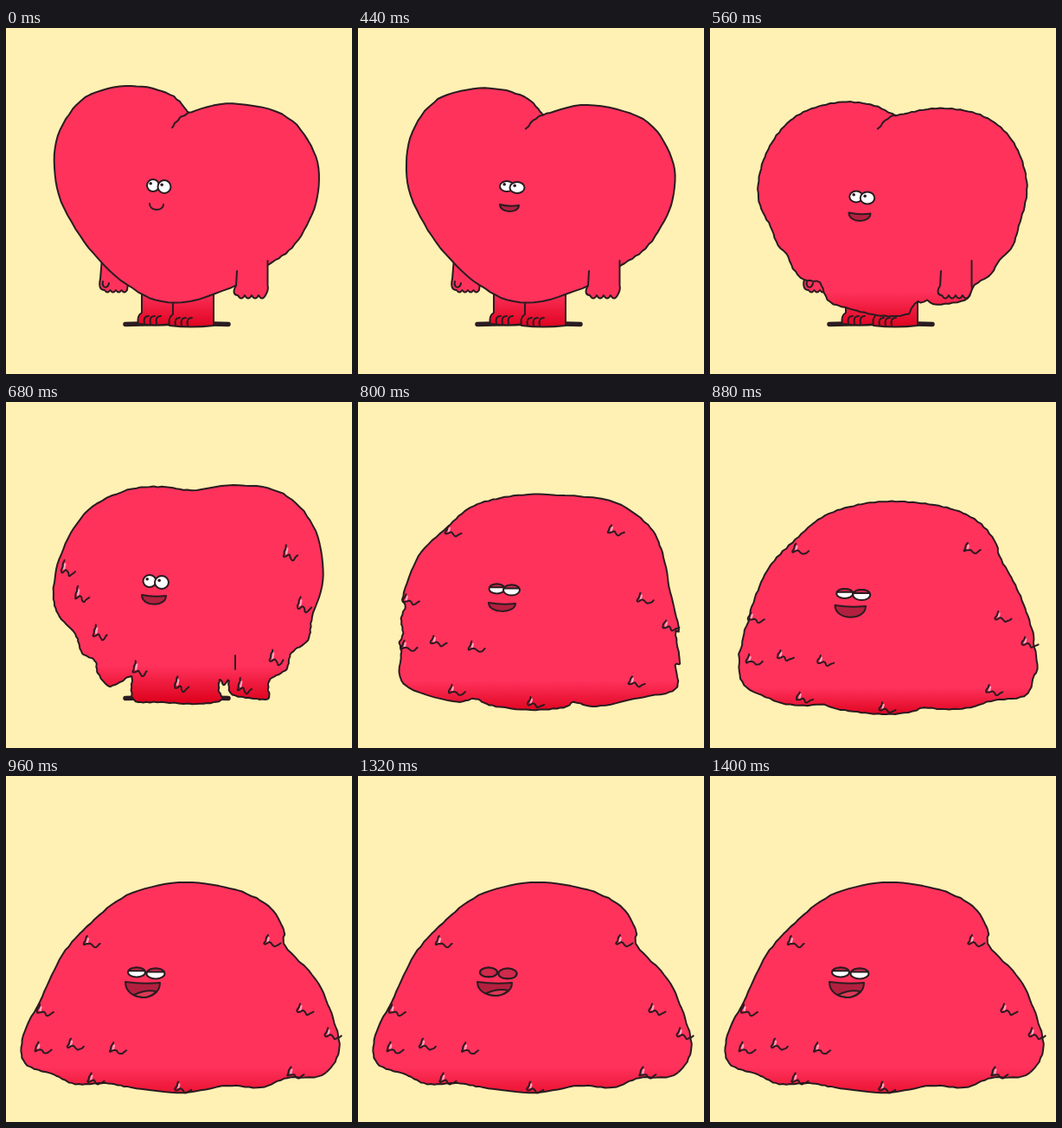
These frames come from a looping animation (400x400 px, 1.52 s). An HTML page:

```html
<!DOCTYPE html>
<html lang="en">
<head>
<meta charset="utf-8">
<title>Melting heart</title>
<style>
html, body { margin: 0; width: 100%; height: 100%; overflow: hidden; background: #fff0b3; }
svg { display: block; width: 100%; height: 100%; }
.pose { display: none; stroke: #2a1c20; stroke-width: 2; stroke-linecap: round; stroke-linejoin: round; fill: none; }
.pose.on { display: block; }
.shine { stroke: #ffa3bd; stroke-width: 2.4; }
</style>
</head>
<body>
<svg id="stage" viewBox="0 0 400 400"></svg>
<script>
const LOOP = 1520;
const SKIN = '#ff325c', DEEP = '#df0420', MOUTH = '#b3203f', TONGUE = '#dc3a56', LID = '#d02a4c';
const stage = document.getElementById('stage');

const points = s => s.split(' ').map(p => p.split(',').map(Number));
const mix = (a, b, t = .5) => a.map((v, i) => v + (b[i] - v) * t);

// Catmull-Rom curve through the points, as a dense polyline
function curve(pts, closed) {
  const n = pts.length, out = [], last = closed ? n : n - 1;
  const at = i => pts[closed ? (i + n) % n : Math.max(0, Math.min(n - 1, i))];
  for (let i = 0; i < last; i++) {
    const [a, b, c, d] = [at(i - 1), at(i), at(i + 1), at(i + 2)];
    for (let t = 0; t < 1; t += 1 / 8)
      out.push(b.map((v, j) => v + .5 * t * (c[j] - a[j] + t * (2 * a[j] - 5 * v + 4 * c[j] - d[j]
        + t * (3 * (v - c[j]) + d[j] - a[j])))));
  }
  return [...out, at(last)];
}

// Evenly spaced points along a polyline
function spread(line, n) {
  const sum = [0];
  for (let i = 1; i < line.length; i++)
    sum.push(sum[i - 1] + Math.hypot(line[i][0] - line[i - 1][0], line[i][1] - line[i - 1][1]));
  const out = [];
  for (let k = 0, i = 1; k <= n; k++) {
    const s = sum[sum.length - 1] * k / n;
    while (i < line.length - 1 && sum[i] < s) i++;
    out.push(mix(line[i - 1], line[i], (s - sum[i - 1]) / (sum[i] - sum[i - 1] || 1)));
  }
  return out;
}

function halfway(a, b) {
  const to = spread(b, 200);
  return spread(a, 200).map((p, i) => mix(p, to[i]));
}

// A slight wobble gives the hand-drawn line
const toPath = line => 'M' + line.map(([x, y]) =>
  (x + .4 * Math.sin(y * .9)).toFixed(1) + ',' + (y + .4 * Math.sin(x * .8)).toFixed(1)).join('L');
const path = (d, attrs = '') => `<path d="${d}" ${attrs}/>`;
const filled = (d, color) => path(d, `fill="${color}"`);

let defs = '';
function shade(id, top, bottom, color = DEEP) {
  defs += `<linearGradient id="${id}" gradientUnits="userSpaceOnUse" x1="0" x2="0" y1="${top}" y2="${bottom}">
    <stop stop-color="${SKIN}"/><stop offset="1" stop-color="${color}"/></linearGradient>`;
  return `url(#${id})`;
}

// Face: left eye x, y, radii, gap to the right eye, lid closure, mouth x, y, width, height
function face([x, y, rx, ry, gap, lid, mx, my, w, h]) {
  return eye(x, y, rx, ry, lid) + eye(x + gap, y + 1.5, rx + .5, ry + .5, lid) + mouth(mx, my, w, h);
}

function eye(x, y, rx, ry, lid) {
  const white = `<ellipse cx="${x}" cy="${y}" rx="${rx}" ry="${ry}" fill="#fff"/>`;
  if (!lid) return white + `<circle cx="${x - 2.8}" cy="${y - 2.3}" r="1.8" fill="#2a1c20" stroke="none"/>`;
  const k = 2 * lid - 1, c = rx * Math.sqrt(1 - k * k), edge = y + ry * k;
  return white + filled(`M${x - c},${edge}A${rx},${ry} 0 ${+(k > 0)} 1 ${x + c},${edge}Z`, LID);
}

function mouth(x, y, w, h) {
  if (h < 8) return path(`M${x},${y}c0,${h * 1.3} ${w},${h * 1.3} ${w},1`);
  const low = y + h * 1.3;
  const open = filled(`M${x},${y}q${w / 2},3 ${w},1C${x + w},${low} ${x},${low} ${x},${y}Z`, MOUTH);
  if (h < 15) return open;
  return open + filled(`M${x + w * .24},${y + h * .84}Q${x + w * .6},${y + h * .45} ${x + w * .9},${y + h * .62}`
    + `Q${x + w * .6},${y + h * 1.25} ${x + w * .24},${y + h * .84}Z`, TONGUE);
}

const faces = {
  idle: [170, 182, 7, 7, 13, 0, 166, 203, 16, 7],
  swell: [172, 183, 8, 6, 12, 0, 164, 204, 22, 8],
  melt: [166, 207, 7.5, 7, 14, 0, 157, 223, 28, 11],
  slump: [160.5, 216, 9, 5.5, 17, .33, 151, 232, 31, 10],
  puddle: [151, 227, 10, 5.5, 22, .33, 138, 238, 40, 18]
};
faces.sag = mix(faces.swell, faces.melt);
faces.spill = mix(faces.slump, faces.puddle);
faces.blink = faces.puddle.with(5, .95).with(9, 16);

// Outlines run clockwise from the top
const heart = curve(points('211,98 262,87 325,103 358,149 358,203 334,250 303,274 266,298 195,318 140,297 '
  + '90,247 59,185 60,125 92,80 145,67 190,77 211,98'));
const melted = curve(points('215,102 270,96 320,106 355,143 367,200 354,248 349,275 330,290 324,309 306,320 303,331 '
  + '303,343 280,342 260,337 257,322 252,327 247,321 246,333 248,345 220,349 180,347 150,346 145,333 145,317 130,325 '
  + '118,328 106,313 103,299 88,290 80,268 60,245 55,215 66,170 95,125 140,102 180,98'), true);
const slumped = curve(points('210,107 290,114 335,142 352,175 361,220 371,262 367,267 372,300 367,305 367,332 325,342 '
  + '275,352 250,347 238,353 200,356 155,351 135,343 110,346 53,326 50,288 48,278 52,268 50,250 55,236 52,225 '
  + '70,178 103,145 130,122 165,111'), true);
const pooled = curve(points('200,123 260,130 303,150 321,178 323,197 358,235 378,280 385,318 365,346 325,349 295,360 '
  + '255,358 205,366 145,360 115,355 80,356 55,345 22,332 20,300 42,255 65,207 98,170 140,138'), true);
const curl = points('192,115 200,105 211,98');

// The upper part widens to the right while the top sinks
const puff = ([x, y]) => [x + 5 * (x - 55) / 307 * Math.min(1, (318 - y) / 150), y + (318 - y) * .01];

const shadow = path('M138,342.5Q198,340.5 257,342.5', 'stroke-width="5.5"');
const legFill = shade('legs', 305, 345);

const fingers = (n, w, h) => `q${w / 2},${h} ${w},0`.repeat(n);

function foot(x, y, left, right) {
  const leg = `M${left},296V${y - 13}Q${x - 2},${y - 9} ${x},${y}Q${(x + right) / 2},${y + 3} ${right},${y}V296`;
  const toes = [7, 14, 21].map(d => path(`M${x + d},${y}q-2,-9 5,-9`)).join('');
  return filled(leg, legFill) + toes;
}

function heartPose(line, curlLine, fill, look) {
  const leftArm = `M111,266L109,290C107,299 109,303 114,303${fingers(4, 6.5, 5)}L142,288`;
  const rightArm = `M267,281L266,298C262,304 263,309 268,309${fingers(4, 8, 7)}Q304,302 302.5,298V269`;
  return shadow + foot(153, 342, 157, 193) + foot(189, 344, 193, 240) + filled(leftArm, SKIN)
    + path('M112,293C110,301 118,302 119,295') + filled(toPath(line), fill) + path(toPath(curve(curlLine)))
    + filled(rightArm, SKIN) + face(look);
}

// A w-shaped drip with a highlight beside its first stroke
function drip([x, y], w, h) {
  const line = [[.2, 0], [0, .75], [.38, .65], [.62, 1], [1, .7]].map(([u, v]) => [x + u * w, y + v * h]);
  return path(`M${x + w * .2},${y + h * .55}l1,${-h * .3}`, 'class="shine"') + path(toPath(curve(line)));
}

const blobPose = (line, fill, drips, w, h, look) =>
  filled(toPath(line) + 'Z', fill) + drips.map(p => drip(p, w, h)).join('') + face(look);

const meltDrips = points('64,183 80,213 101,257 147,299 195,317 321,165 337,225 305,286 268,319');
const slumpDrips = points('101,143 52,222 50,276 84,270 128,277 105,327 196,341 289,142 323,221 352,252 313,317');

// Drips slide down and outwards with the skin, less near the ground
const slide = t => slumpDrips.map(([x, y]) =>
  [x + t * .11 * (x - 200), y + t * Math.min(42, 12 + .3 * (342 - y))]);

const puffed = heart.map(puff);
const puddle = look => blobPose(pooled, 'url(#pool)', slide(1), 19, 13, look);
shade('pool', 336, 368, '#ea1232');

const poses = {
  idle: heartPose(heart, curl, SKIN, faces.idle),
  swell: heartPose(puffed, curl.map(puff), SKIN, faces.swell),
  sag: heartPose(halfway(puffed, melted), curl.map(puff), legFill, faces.sag),
  melt: shadow + blobPose(melted, legFill, meltDrips, 16, 18, faces.melt) + path('M265,293V309'),
  slump: blobPose(slumped, shade('slumpFill', 322, 358), slide(0), 19, 12, faces.slump),
  spill: blobPose(halfway(slumped, pooled), shade('spillFill', 330, 362), slide(.5), 19, 12, faces.spill),
  puddle: puddle(faces.puddle),
  blink: puddle(faces.blink)
};

const timeline = [[0, 'idle'], [440, 'swell'], [560, 'sag'], [680, 'melt'], [800, 'slump'],
  [880, 'spill'], [960, 'puddle'], [1320, 'blink'], [1400, 'puddle']];

stage.innerHTML = `<defs>${defs}</defs>`
  + Object.entries(poses).map(([name, art]) => `<g class="pose" id="${name}">${art}</g>`).join('');

const begin = performance.now();
let shown;
function tick() {
  const t = (performance.now() - begin) % LOOP;
  const name = timeline.findLast(([start]) => start <= t)[1];
  if (name !== shown) {
    if (shown) document.getElementById(shown).classList.remove('on');
    document.getElementById(name).classList.add('on');
    shown = name;
  }
  requestAnimationFrame(tick);
}
tick();
</script>
</body>
</html>
```
